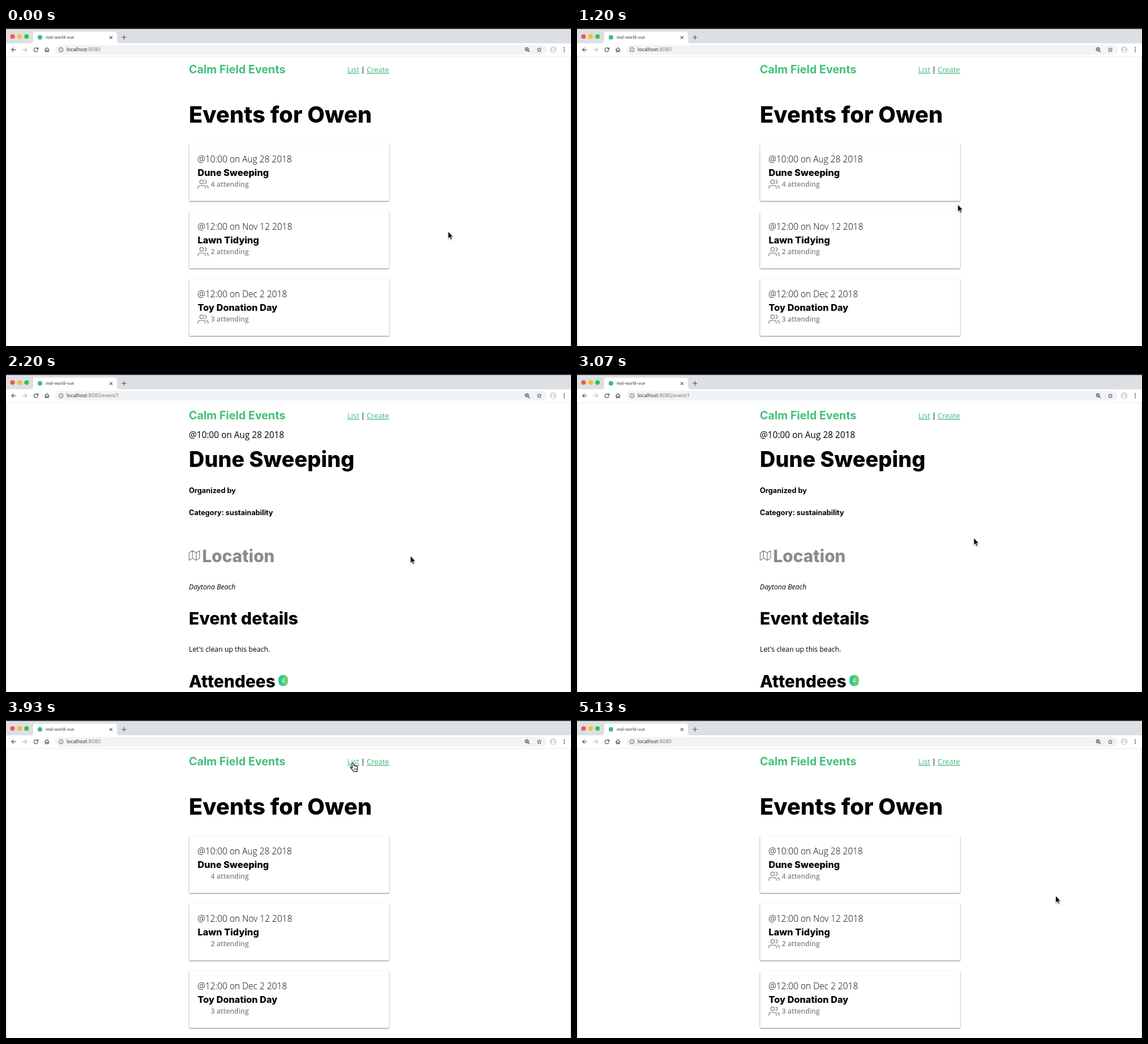
An HTML page for the animation above (5600 ms loop, 998x561 px).

```html
<!DOCTYPE html>
<html lang="en">
<head>
<meta charset="utf-8">
<title>Event list</title>
<style>
  html, body { margin: 0; width: 100%; height: 100%; overflow: hidden; background: #fff; }
  svg { display: block; width: 998px; height: 561px; }
  text { font-family: "Open Sans", sans-serif; font-size: 13px; white-space: pre; }
  .ui { font-family: Inter, sans-serif; font-size: 8.5px; fill: #333; }
  .head { font-family: Inter, sans-serif; font-weight: 800; font-optical-sizing: none; }
  .small { font-size: 12.35px; }
  .icon { fill: none; stroke: #555; stroke-width: 1.2; }
  .feather { fill: none; stroke: #8c8c8c; stroke-width: 1.7; stroke-linecap: round; stroke-linejoin: round; }
  .link { fill: #3dba7c; text-decoration: underline; }
  .card { fill: #fff; }
</style>
</head>
<body>
<svg id="stage" viewBox="0 0 998 561"></svg>
<script>
const LOOP = 5600, FPS = 15;
const OPEN = 1870, BACK = 3930, HOVER = 1230;

const text = (x, y, str, attrs = '') => `<text x="${x}" y="${y}" ${attrs}>${str}</text>`;
const head = (x, y, size, str, extra = '') =>
  text(x, y, str, `class="head" style="font-size:${size}px;${extra}"`);
const dot = (x, y, r, fill) => `<circle cx="${x}" cy="${y}" r="${r}" fill="${fill}"/>`;
const line = (d, extra = '') => `<path class="icon" d="${d}" ${extra}/>`;

const browser = `
  <rect width="998" height="27" fill="#dce0e4"/>
  <rect width="998" height="1.6" fill="#15181b"/>
  ${dot(11.5, 15, 4, '#f9544d')}${dot(24, 15, 4, '#f8bd33')}${dot(36.3, 15, 4, '#2fc63f')}
  <path d="M43 27Q48 27 48 22V11Q48 6.5 52.5 6.5H191.5Q196 6.5 196 11V22Q196 27 201 27Z" fill="#fff"/>
  ${dot(60, 16.5, 4, '#41b883')}
  ${text(70, 19, 'real-world-vue', 'class="ui" style="font-size:7.1px"')}
  ${line('M183 14.3l4.8 4.8m0-4.8l-4.8 4.8M208.5 12.5v8m-4-4h8')}
  <rect x="87" y="30" width="868" height="17" rx="8.5" fill="#f1f3f4"/>
  ${line('M17.5 38.3h-7.5m3.5-3.6l-3.6 3.6l3.6 3.6')}
  ${line('M29 38.3h7.5m-3.5-3.6l3.6 3.6l-3.6 3.6', 'style="stroke:#bbb"')}
  ${line('M55.8 36.5a3.5 3.5 0 1 0 .4 2.5M56.7 34.3v2.9h-2.9')}
  ${line('M68.3 38.5l4-3.7l4 3.7M69.5 38v4h1.8v-2.5h2v2.5h1.8v-4')}
  ${line('M101 38.3a3.8 3.8 0 1 0-7.6 0a3.8 3.8 0 1 0 7.6 0M97.2 37.8v2.5M97.2 35.8v1', 'style="stroke-width:.9"')}
  ${line('M923 37.5a2.9 2.9 0 1 0-5.8 0a2.9 2.9 0 1 0 5.8 0M922.3 39.7l2.8 2.8M918.7 37.5h2.8M920.1 36.1v2.8')}
  ${line('M942 34.6l1.1 2.5l2.7.2l-2.1 1.8l.7 2.7l-2.4-1.5l-2.4 1.5l.7-2.7l-2.1-1.8l2.7-.2Z', 'style="stroke-width:1"')}
  ${dot(966.5, 38.3, 6, '#d5d7d9')}
  ${dot(966.5, 36.7, 2.1, '#f8f8f8')}<path d="M963 42.5q0-3.5 3.5-3.5t3.5 3.5Z" fill="#f8f8f8"/>
  ${[35, 38.3, 41.6].map(y => dot(986, y, 1, '#444')).join('')}
  <path d="M0 50.5H998" stroke="#e9ebec"/>
  <path d="M.5 50V561M997.5 50V561" stroke="#d3d6d8"/>
  <text class="ui" x="107" y="41.3">localhost<tspan fill="#7a7d80">:8080</tspan><tspan id="path" fill="#7a7d80">/event/1</tspan></text>`;

const nav = head(323, 80.3, 19.7, 'Calm Field Events', 'font-weight:700;fill:#40c07a') +
  text(603, 78.3, 'List', 'class="link"') + text(627, 78.3, '|') + text(637, 78.3, 'Create', 'class="link"');

const users = `<g class="feather users" transform="translate(338.2 265.8) scale(.82)">
  <path d="M17 21v-2a4 4 0 0 0-4-4H5a4 4 0 0 0-4 4v2M23 21v-2a4 4 0 0 0-3-3.87M16 3.13a4 4 0 0 1 0 7.75"/>
  <circle cx="9" cy="7" r="4"/></g>`;

const card = ([date, name, count], i) => `<g transform="translate(0 ${i * 119})"><g class="event">
  <rect class="card" x="323.5" y="205" width="353.3" height="100" rx="1"/>
  ${text(338.2, 237, date, 'style="font-size:15.5px;font-weight:300"')}
  ${head(338.5, 261, 16.3, name)}${users}
  ${text(361.8, 280, count + ' attending', 'fill="#858585" style="font-size:12.2px;font-weight:600"')}</g></g>`;

const list = head(323, 166.7, 39.8, 'Events for Owen') + [
  ['@10:00 on Aug 28 2018', 'Dune Sweeping', 4],
  ['@12:00 on Nov 12 2018', 'Lawn Tidying', 2],
  ['@12:00 on Dec 2 2018', 'Toy Donation Day', 3]
].map(card).join('');

const detail = `
  ${text(323, 113, '@10:00 on Aug 28 2018', 'style="font-size:15.4px"')}
  ${head(323, 163.5, 37.9, 'Dune Sweeping')}
  ${head(323, 210, 12.8, 'Organized by', 'font-weight:700')}
  ${head(323, 249.3, 12.7, 'Category: sustainability', 'font-weight:700')}
  <path class="feather" transform="translate(322.7 310.3) scale(.83)"
    d="M1 6V22L8 18L16 22L23 18V2L16 6L8 2ZM8 2V18M16 6V22"/>
  ${head(346.5, 332, 29.8, 'Location', 'fill:#8c8c8c')}
  ${text(323, 379.7, 'Daytona Beach', 'class="small" font-style="italic"')}
  ${head(323, 442, 30.2, 'Event details')}
  ${text(323, 490, "Let's clean up this beach.", 'class="small"')}
  ${head(323, 552.7, 29.8, 'Attendees')}
  <rect x="481.3" y="531" width="16.8" height="19.5" rx="7.5" fill="url(#badge)"/>
  ${text(489.7, 544.5, '4', 'fill="#fff" text-anchor="middle" style="font-size:10px"')}`;

const cursors = `
  <path id="arrow" d="M0 0V12.5L2.8 9.9L4.7 14.3L6.7 13.5L4.9 9.2H8.7Z"
    stroke="#fff" stroke-width=".8" style="filter:drop-shadow(0 1px 1px #0005)"/>
  <g id="hand" fill="#fff" stroke="#111" stroke-width="1.2" stroke-linejoin="round">
    <path d="M-1.4 1.2Q-1.4-.3 0-.2Q1.2 0 1.5 1.5L2.3 5.2Q3.4 4.3 4.4 5.4Q5.6 4.6 6.5 5.8Q8 5.3 8.5 7Q9.2 10 8 12L7.6 15.2H1.6Q.5 13-1.5 11L-4 8.2Q-4.4 6.8-3 6.8Q-1.8 7-.4 8.6Z"/>
    <path d="M2.8 9.5v3M4.8 9.5v3M6.7 9.5v3" stroke-width=".8"/></g>`;

const $ = id => document.getElementById(id);
$('stage').innerHTML = `<defs><linearGradient id="badge">
  <stop stop-color="#16c3a4"/><stop offset="1" stop-color="#86d265"/></linearGradient></defs>
  ${browser}${nav}<g id="list">${list}</g><g id="detail">${detail}</g><g id="cursor">${cursors}</g>`;

const show = (el, on) => el.style.display = on ? '' : 'none';
const shadow = (el, y, blur) =>
  el.style.filter = `drop-shadow(0 ${y}px ${blur}px rgba(0,0,0,.5))`;
const icons = document.querySelectorAll('.users');
const boxes = document.querySelectorAll('.card');
const first = document.querySelector('.event');
boxes.forEach(box => shadow(box, 1, 0.9));

// Pointer moves: start, end, target x, target y, downward bend
const moves = [
  [600, 1600, 614, 273, 9],
  [OPEN, 2200, 714.5, 321, 0],
  [2930, 3530, 612.3, 81, 0],
  [3530, 3670, 612.3, 75.7, 0],
  [BACK, 4400, 845.5, 310, 0]
];
const clamp = u => Math.min(1, Math.max(0, u));
const ease = u => u * u * (3 - 2 * u);

function pointer(t) {
  let x = 781, y = 359;
  for (const [from, to, tx, ty, bend] of moves) {
    const p = ease(clamp((t - from) / (to - from)));
    x += (tx - x) * p;
    y += (ty - y) * p + bend * 4 * p * (1 - p);
  }
  return [x, y];
}

function draw(now) {
  const t = Math.floor((now % LOOP + 5) * FPS / 1000) * 1000 / FPS;
  const open = t >= OPEN - 5 && t < BACK;
  show($('detail'), open);
  show($('path'), open);
  show($('list'), !open);
  icons.forEach(icon => show(icon, t < BACK || t >= BACK + 60));

  const lift = t < OPEN - 5 ? ease(clamp((t - HOVER) / 200)) : 0;
  const scale = 1 + 0.01 * lift;
  first.setAttribute('transform', `translate(500.2 255) scale(${scale}) translate(-500.2 -255)`);
  shadow(boxes[0], 1 + 0.5 * lift, 0.9 + 2.6 * lift);

  const hand = t >= HOVER && t < OPEN - 5 || t >= 3460 && t < BACK + 60;
  show($('hand'), hand);
  show($('arrow'), !hand);
  $('cursor').setAttribute('transform', `translate(${pointer(t)})`);
}

const start = performance.now();
function tick() {
  draw(performance.now() - start);
  requestAnimationFrame(tick);
}
tick();
</script>
</body>
</html>
```
